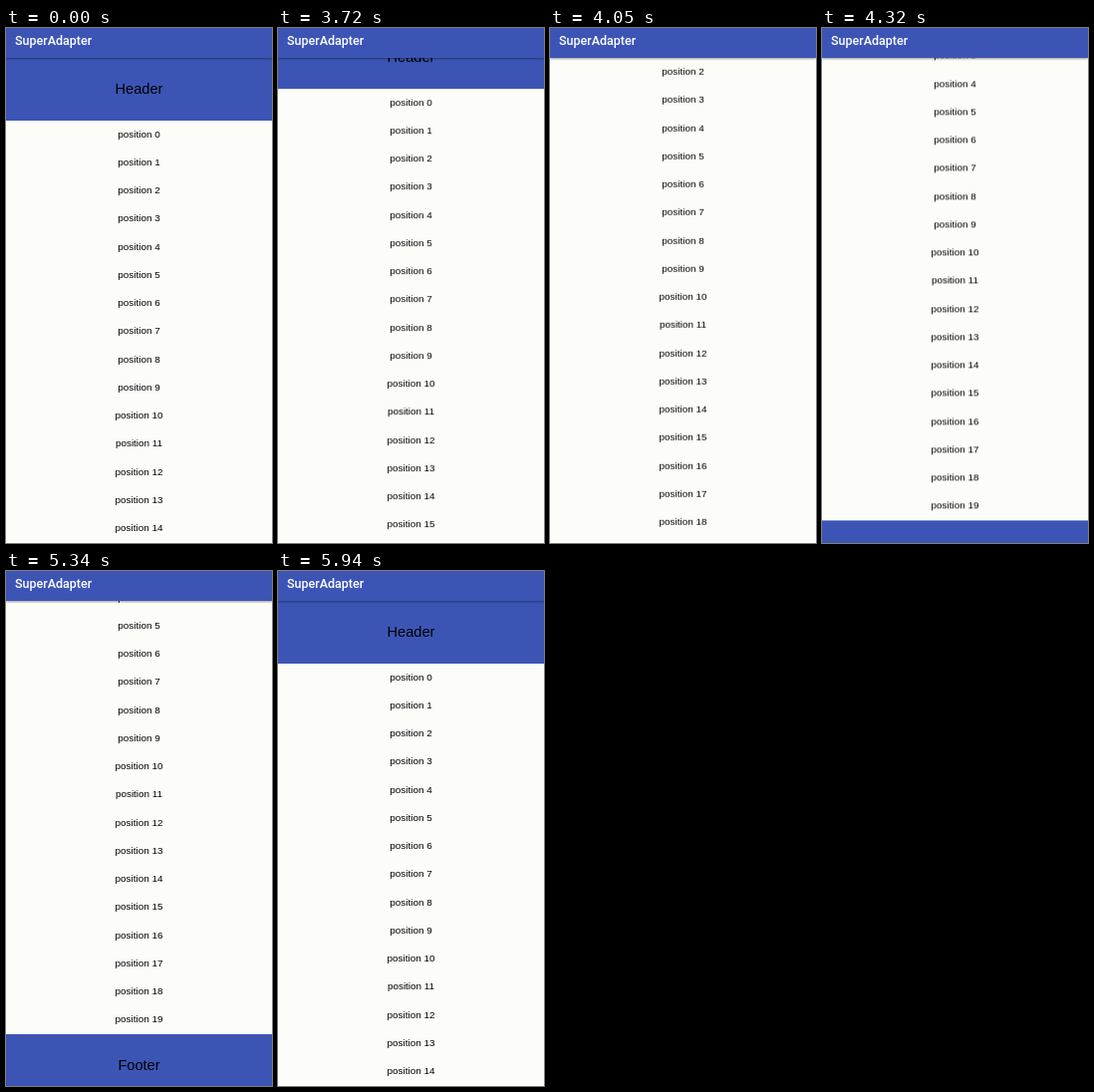
These frames come from a looping animation (267x517 px, 6.81 s). An HTML page:

```html
<!DOCTYPE html>
<html lang="en">
<head>
<meta charset="utf-8">
<title>SuperAdapter</title>
<style>
  html, body { margin: 0; width: 100%; height: 100%; overflow: hidden; }
  body { position: relative; background: #fcfdf9; }
  #bar {
    position: absolute; top: 0; left: 0; right: 0; height: 30px;
    padding-left: 9px; box-sizing: border-box;
    background: #3c55b5; color: #fff;
    font: 500 12.5px/26px Roboto, sans-serif;
    box-shadow: 0 1px 2px rgba(0, 0, 0, .4);
  }
  #list {
    position: absolute; top: 30px; left: 0; right: 0;
    color: #000; text-align: center; will-change: transform;
    font: 9.9px/28.25px "Liberation Sans", Arial, sans-serif;
  }
  #list div { height: 28.25px; }
  #list .band { height: 62.5px; background: #3c55b5; font-size: 14.6px; line-height: 63.5px; }
</style>
</head>
<body>
<div id="list"></div>
<div id="bar">SuperAdapter</div>
<script>
const LOOP = 6810, ROWS = 20;
const list = document.getElementById('list');

function addRow(text, className = '') {
  const row = document.createElement('div');
  row.textContent = text;
  row.className = className;
  list.append(row);
}

addRow('Header', 'band');
for (let i = 0; i < ROWS; i++) addRow('position ' + i);
addRow('Footer', 'band');

// Scroll keys: time in ms, offset in px, speed in px per ms
const keys = [
  [0, 0, 0], [3210, 0, 0], [3720, 31.7, .18], [4050, 119, .23],
  [4590, 186.5, .07], [4710, 193, .01], [4740, 193, 0],
  [5340, 193, 0], [5860, 0, -.45], [5861, 0, 0], [LOOP, 0, 0]
];

// Cubic Hermite curve through the keys
function scrollAt(t) {
  const i = keys.findIndex(key => key[0] > t);
  const [t0, y0, v0] = keys[i - 1], [t1, y1, v1] = keys[i];
  const d = t1 - t0, u = (t - t0) / d, w = 1 - u;
  return w * w * ((1 + 2 * u) * y0 + u * d * v0)
       + u * u * ((1 + 2 * w) * y1 - w * d * v1);
}

function draw() {
  const y = scrollAt(performance.now() % LOOP);
  list.style.transform = `translateY(${-y}px)`;
  requestAnimationFrame(draw);
}
draw();
</script>
</body>
</html>
```
